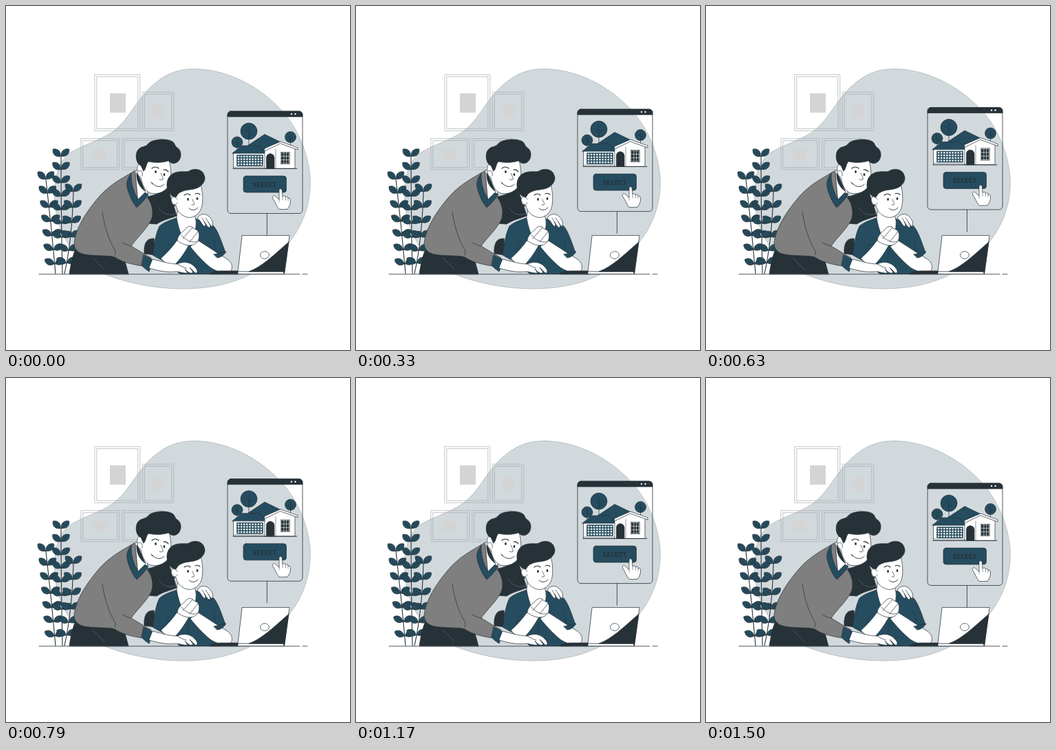
These frames come from a looping animation (500x500 px, 1540 ms). An HTML page with a canvas:

```html
<!DOCTYPE html>
<html lang="en">
<head>
<meta charset="utf-8">
<title>Choosing a house</title>
<style>
html, body { margin: 0; width: 100%; height: 100%; overflow: hidden; background: #fff; }
canvas { display: block; width: 500px; height: 500px; }
</style>
</head>
<body>
<canvas id="stage" width="500" height="500"></canvas>
<script>
const ctx = document.getElementById('stage').getContext('2d');
const INK = '#263238', BLUE = '#254c5f', GRAY = '#7f7f7f', SKY = '#d2d9dd', WHITE = '#fff';
const LOOP = 1540, FPS = 24, FLOAT_MS = 1500, RISE = 6.6;

function paint(path, fill, stroke = INK, width = 0.7) {
  if (fill) { ctx.fillStyle = fill; ctx.fill(path); }
  if (stroke) { ctx.strokeStyle = stroke; ctx.lineWidth = width; ctx.stroke(path); }
}
const shape = (d, ...style) => paint(new Path2D(d), ...style);
const line = (d, color = INK, width = 0.7) => shape(d, null, color, width);

function box(x1, y1, x2, y2, r, ...style) {
  const p = new Path2D();
  p.roundRect(x1, y1, x2 - x1, y2 - y1, r);
  paint(p, ...style);
}
function oval(x, y, rx, ry, ...style) {
  const p = new Path2D();
  p.ellipse(x, y, rx, ry, 0, 0, Math.PI * 2);
  paint(p, ...style);
}

function backdrop() {
  shape('M275 91.5C316 92 358 111 390 141C420 168 438 207 442 247C445 291 427 332 397 359' +
    'C363 395 315 411 257 411C214 411 174 402 141 389C98 370 74 330 71 285C69 252 75 226 94 213' +
    'C117 199 144 194 163 176C181 160 194 128 222 108C238 96 255 91 275 91.5Z', SKY, '#9da6aa', 0.6);
  const frames = [
    [129, 99.5, 195, 181.5, 151, 127, 174, 155],
    [198.5, 125, 244, 181.5, 213, 144, 229, 163],
    [109, 192.5, 165, 238, 127, 208, 146, 223],
    [169, 192.5, 227, 238]
  ];
  for (const [x1, y1, x2, y2, ...art] of frames) {
    for (const d of [0.2, 3.2]) box(x1 + d, y1 + d, x2 - d, y2 - d, 0, null, '#a8acae', 0.7);
    if (art.length) box(...art, 0, '#d4d4d4', null);
  }
}

function leaf(x, y, angle) {
  ctx.save();
  ctx.translate(x, y);
  ctx.rotate(angle);
  shape('M1 0C4 -6 12 -6.5 16 0C12 6 5 5.5 1 0Z', BLUE, INK, 0.7);
  line('M0 0H13', INK, 0.5);
  ctx.restore();
}

// A curved stem with pairs of leaves that flatten towards the foot.
function branch(base, bend, tip, pairs, from) {
  const at = t => [0, 1].map(i =>
    (1 - t) ** 2 * base[i] + 2 * t * (1 - t) * bend[i] + t * t * tip[i]);
  line(`M${base}Q${bend} ${tip}`, INK, 1.1);
  for (let i = 0; i < pairs; i++) {
    const t = from + (1 - from) * i / (pairs - 1);
    const [x, y] = at(t), tilt = 0.4 + 0.35 * t;
    leaf(x, y, tilt - Math.PI);
    leaf(x, y, -tilt);
  }
}

function plant() {
  branch([72, 389], [66, 320], [58, 252], 7, 0.1);
  branch([82, 389], [80, 300], [80, 219], 7, 0.3);
  branch([85, 389], [96, 340], [98, 270], 6, 0.15);
}

function man() {
  // far arm, behind the woman
  shape('M206 277C219 275 228 268 235 264C239 279 245 292 248 305C238 309 228 311 219 317L206 316Z', INK);
  line('M222 293C228 302 237 306 246 302', '#7d878b', 0.5);
  shape('M92 389.5C94 376 97 360 103 350C128 354 160 360 173 371L178 389.5Z', INK);
  // sweater and near sleeve
  shape('M186 240C174 248 151 258 133 280C117 299 101 323 99 345C99 353 104 359 114 361' +
    'C132 364 149 362 158 365C168 372 184 376 199 378L211 366C201 361 191 354 182 349' +
    'C190 337 204 325 211 311C215 302 213 287 205 278Z', GRAY);
  line('M126 366L143 383', '#76818a', 0.5);
  line('M140 299C143 320 149 338 155 349C159 355 160 359 158 362');
  line('M182 349C177 348 173 346 169 344');
  // neck and collar
  shape('M188 239L202 239L206 273L192 284Z', WHITE);
  shape('M190 243C195 248 197 259 203 270C195 264 189 255 190 243Z', INK);
  shape('M182 243C176 251 175 257 176 263C179 276 184 286 190 293C196 288 202 281 207 274' +
    'L202 271L192 281C187 273 182 260 182 248Z', BLUE);
  shape('M200 362L214 369L208 386C203 383 199 379 197 377Z', BLUE);
  // head
  shape('M196 225L237 224C240 235 241 249 238 258C234 269 221 275 210 272C202 269 198 260 196 249' +
    'C190 248 188 230 195 229Z', WHITE);
  shape('M196 232C188 229 187 213 193 208C196 204 203 205 206 201C211 193 238 191 244 199' +
    'C246 202 246 204 249 206C257 211 255 225 247 228C243 230 239 228 236 225' +
    'C228 228 215 228 207 226C203 230 204 237 200 240Z', INK);
  line('M192 240C197 237 199 242 198 247');
  oval(217.5, 241, 1.4, 2, INK, null);
  oval(230, 245, 1.4, 2, INK, null);
  line('M212 236Q217 232 222 236M229 238Q233 237 236 241', INK, 1.2);
  line('M225 243C226 246 229 249 228 252Q226 254 223 252');
  line('M212 257C218 264 226 264 230 259M211 256L213 259', INK, 0.9);
}

function restingHand() {
  shape('M213 368C226 371 237 375 249 375C260 370 269 373 275 380C279 384 279 389 275 388' +
    'L267 380L272 387C269 390 264 387 260 382L264 388C258 389 252 386 247 386' +
    'C233 388 219 384 208 381Z', WHITE);
  line('M249 375C254 378 258 380 262 381');
}

function woman() {
  shape('M215 338C204 337 200 346 201 360L216 362Z', INK);
  // shirt
  shape('M248 308C239 311 228 315 223 320C217 332 215 349 213 362C219 366 227 369 234 374' +
    'C242 379 247 385 253 389.5L311 389.5L310 368L319 358C314 345 309 328 302 320' +
    'C294 315 281 311 272 308Z', BLUE);
  shape('M250 292L248 308C250 319 253 330 258 338H271C275 329 277 320 276 311L273 300Z', WHITE);
  line('M237 345L231 361M302 338L306 360M266 354L264 372', INK, 0.5);
  // forearms and clasped hands
  shape('M278 340C291 348 308 360 322 368C330 374 331 384 323 388C315 389 305 385 297 380' +
    'C287 372 276 360 268 350Z', WHITE);
  shape('M302 361L320 357C316 363 311 366 307 366Z', BLUE);
  shape('M249 340L266 347C259 360 251 371 242 379C236 377 230 372 225 367C235 358 243 349 249 340Z', WHITE);
  shape('M249 341C249 335 254 330 259 326C264 319 270 319 272 323L278 326C282 330 281 337 279 342' +
    'C273 350 261 350 249 341Z', WHITE);
  line('M257 338L271 322M267 343L279 328M255 333C259 339 271 346 278 342');
  // hand on the shoulder
  shape('M279 307C282 302 289 301 294 305C299 309 302 315 300 320C298 321 296 317 294 314' +
    'C297 318 298 322 295 322C291 320 290 315 288 313C290 317 291 321 288 320C284 317 283 311 279 310Z', WHITE);
  line('M294 314L290 308M288 313L285 308');
  // head
  shape('M246 266L283 259C286 270 287 284 284 294C280 304 271 309 263 307C254 304 249 299 247 290' +
    'C240 291 238 279 244 277Z', WHITE);
  shape('M246 279C243 277 239 275 237 271C231 261 234 247 244 243C252 239 261 242 266 240' +
    'C273 235 286 237 288 246C291 252 287 259 281 263C273 268 261 266 253 271C249 273 249 276 246 279Z', INK);
  shape('M249 281C244 274 238 278 241 285C243 290 247 290 249 286', WHITE);
  oval(244, 290, 1.6, 1.6, INK, null);
  oval(264.5, 281, 1.4, 1.9, INK, null);
  oval(278, 280, 1.4, 1.9, INK, null);
  line('M259 275Q264 271 268 275M275 273Q279 271 282 274', INK, 1.1);
  line('M271 281C272 285 275 287 273 289L270 289');
  line('M266 294C270 298 276 297 279 293', INK, 0.9);
  line('M237 272C239 286 239 299 227 303', INK, 0.6);
}

function desk() {
  line('M48 389.8H427M431 389.8H438', INK, 0.8);
  shape('M296 389.5C299 386 306 385 314 385H338V389.5Z', INK);
  shape('M343.5 333.5H412L404.5 389.5H337Z', WHITE);
  shape('M411 343L404.5 389.5L403 386H353C372 379 388 363 411 343Z', INK);
  line('M338 386H404', INK, 0.8);
  oval(376, 362, 6.5, 5.3, WHITE);
}

function tree(x, y, r, foot) {
  oval(x, y, r, r, BLUE);
  line(`M${x} ${y - r / 2}V${foot}M${x} ${y + r / 2}l${r / 2.5} ${-r / 2.5}M${x} ${y + r / 4}l${-r / 3} ${-r / 3}`);
}

function panes(x1, y1, x2, y2, columns, rows, glass, bar, width) {
  box(x1, y1, x2, y2, 0, glass, bar, width);
  const bars = new Path2D();
  for (let i = 1; i < columns; i++) {
    const x = x1 + (x2 - x1) * i / columns;
    bars.moveTo(x, y1); bars.lineTo(x, y2);
  }
  for (let i = 1; i < rows; i++) {
    const y = y1 + (y2 - y1) * i / rows;
    bars.moveTo(x1, y); bars.lineTo(x2, y);
  }
  paint(bars, null, bar, width);
}

function house() {
  tree(336, 198, 8, 213);
  tree(353, 182, 12, 208);
  tree(413.5, 190.5, 8, 209);
  shape('M345 207L376 186.5L406 201L384 215Z', BLUE);
  box(331, 213, 378, 236, 0, WHITE);
  shape('M329 214L343 203H367L380 214Z', BLUE);
  panes(336, 217, 373, 232, 9, 4, WHITE, BLUE, 1.6);
  line('M331 234H378', INK, 0.5);
  shape('M376 236V210L399 199L420 207V236Z', WHITE);
  shape('M375 211L376 207L399 197L424 206L424 209L399 200Z', WHITE);
  shape('M378.5 236V220C379 213 389 213 390 220V236Z', INK);
  line('M392 208V236', INK, 0.5);
  box(399, 212, 412.5, 230, 0, INK, null);
  panes(400, 213, 411.5, 229, 3, 3, INK, WHITE, 0.6);
  line('M330 236.3H423', INK, 0.9);
}

function pointer() {
  shape('M397 281V268C397 265 401 265 401.2 268L402 277C404 275 406 276 406.5 278' +
    'C408 276 410 277 410 280C412 278 413.5 280 413.5 283C414 289 411 292 409 295.5H397' +
    'C393 291 391 284 388 280C386 276 390 274 392 277Z', WHITE);
  line('M402 277V282M406.5 278V282M410 280V283M397 281V285', INK, 0.5);
}

function listing() {
  line('M379.4 301.5V333.3', INK, 0.8);
  box(322, 153, 431, 301.5, 5, null, INK, 0.8);
  box(322, 153, 431, 161, [5, 5, 0, 0], INK);
  oval(415, 157, 1.2, 1.2, WHITE, null);
  oval(420.5, 157, 1.2, 1.2, WHITE, null);
  house();
  box(345, 247, 407.5, 271, 4, BLUE);
  ctx.fillStyle = INK;
  ctx.font = 'bold 9.5px "Noto Sans CJK JP", "Noto Sans CJK SC", Roboto, sans-serif';
  ctx.textAlign = 'center';
  ctx.textBaseline = 'alphabetic';
  ctx.fillText('SELECT', 376, 262.8);
  pointer();
}

// Even rise and fall, stepped at the playback rate.
function lift(ms) {
  const step = Math.floor(ms * FPS / 1000 + 0.1);
  const phase = (step * 1000 / FPS / FLOAT_MS) % 1;
  return RISE * (1 - Math.abs(1 - 2 * phase));
}

function draw(now) {
  ctx.fillStyle = WHITE;
  ctx.fillRect(0, 0, 500, 500);
  ctx.lineJoin = ctx.lineCap = 'round';
  backdrop();
  plant();
  man();
  woman();
  desk();
  restingHand();
  ctx.save();
  ctx.translate(0, -lift(now % LOOP));
  listing();
  ctx.restore();
  requestAnimationFrame(draw);
}
draw(0);
</script>
</body>
</html>
```
